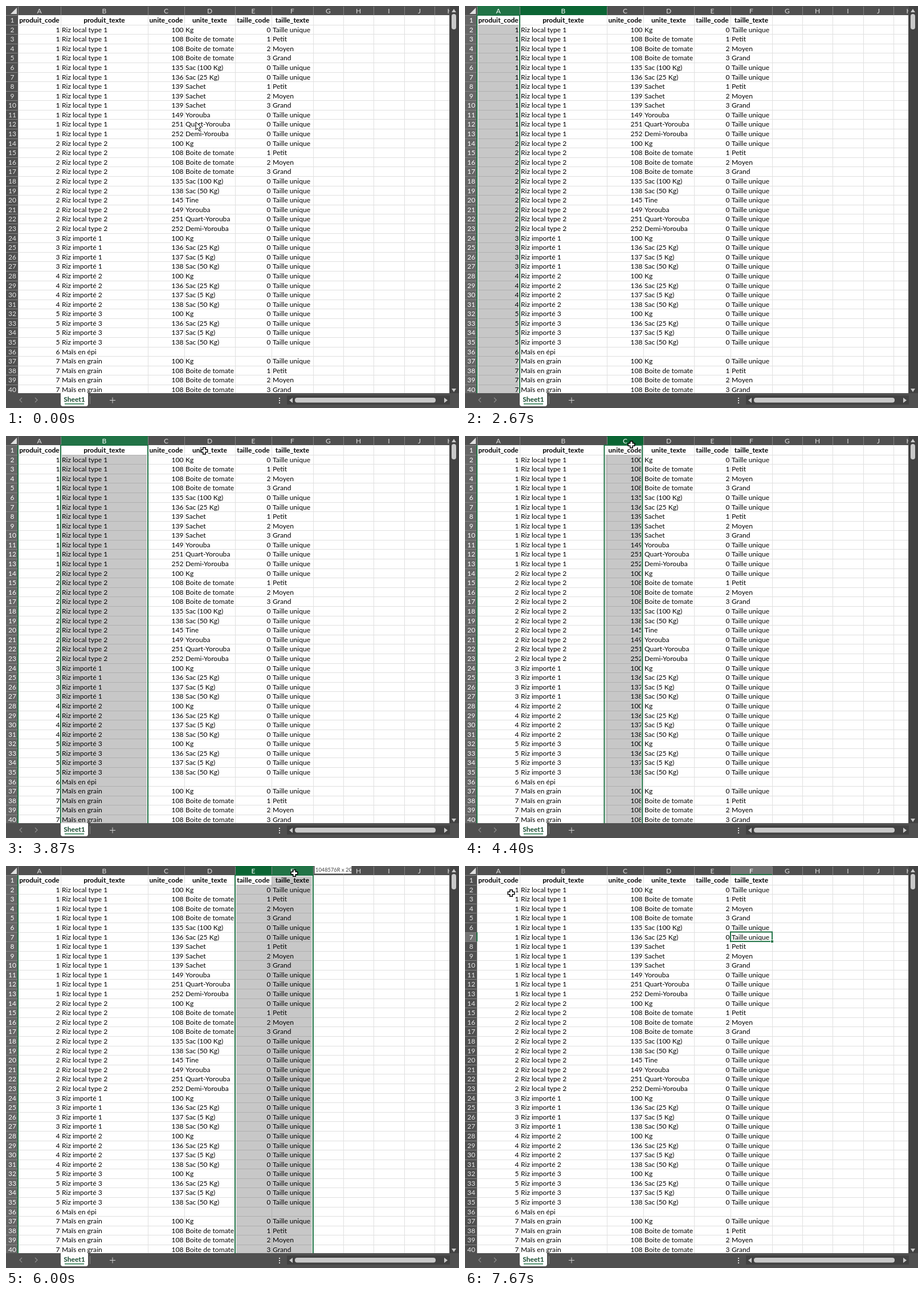
Animation of 795 by 704 pixels, one loop 8000 ms. Source, as an HTML page with a canvas:

```html
<!DOCTYPE html>
<html lang="fr">
<head>
<meta charset="utf-8">
<title>Sheet1</title>
<style>
  html, body { margin: 0; width: 100%; height: 100%; overflow: hidden; background: #505050; }
  canvas { display: block; }
</style>
</head>
<body>
<canvas id="stage" width="795" height="704"></canvas>
<script>
const ctx = document.getElementById('stage').getContext('2d');
const LOOP = 8000, STEP = 200 / 3;
const LEFT = 21, TOP = 16, RIGHT = 778, BOTTOM = 678, ROW_H = 16.59, ROWS = 40;
const GREEN = '#217346', DARK_GREEN = '#0b6534', CHROME = '#505050', ACTIVE = '#737373';
const LIGHT = '#c9c9c9', TRACK = '#424242', SEPARATOR = '#868686', GRID = '#e0e0e0';
const LETTERS = 'ABCDEFGHIJK', WIDTHS = [75, 153, 64, 89, 64, 73], DEFAULT_WIDTH = 53.2;

const EDGES = [LEFT];
[...LETTERS].forEach((_, col) => EDGES.push(EDGES[col] + (WIDTHS[col] ?? DEFAULT_WIDTH)));
const rowTop = row => TOP + (row - 1) * ROW_H;
const columnAt = x => EDGES.findLastIndex(edge => edge <= x);

// Every product is sold in some units, and some units come in three sizes.
const UNITS = {
  100: 'Kg', 108: 'Boite de tomate', 135: 'Sac (100 Kg)', 136: 'Sac (25 Kg)', 137: 'Sac (5 Kg)',
  138: 'Sac (50 Kg)', 139: 'Sachet', 145: 'Tine', 149: 'Yorouba', 251: 'Quart-Yorouba', 252: 'Demi-Yorouba'
};
const SIZES = ['Taille unique', 'Petit', 'Moyen', 'Grand'];
const TITLES = 'produit_code produit_texte unite_code unite_texte taille_code taille_texte'.split(' ');
const pick = test => Object.keys(UNITS).filter(code => test(UNITS[code]));
const isSized = code => /Boite|Sachet/.test(UNITS[code]);
const imported = pick(unit => /^Kg|5 Kg|50 Kg/.test(unit));
const PRODUCTS = [
  ['Riz local type 1', pick(unit => !/\((5|50) Kg|Tine/.test(unit))],
  ['Riz local type 2', pick(unit => !/\((5|25) Kg|Sachet/.test(unit))],
  ...[1, 2, 3].map(n => [`Riz importé ${n}`, imported]),
  ['Maïs en épi', []],
  ['Maïs en grain', pick(unit => /^Kg|Boite/.test(unit))]
];
const cells = PRODUCTS.flatMap(([name, units], i) => units.length
  ? units.flatMap(code => (isSized(code) ? [1, 2, 3] : [0])
      .map(size => [i + 1, name, code, UNITS[code], size, SIZES[size]]))
  : [[i + 1, name]]);

// Ranges selected, by start time.
const SELECTIONS = Object.entries({
  1533: 'J25', 2133: 'A', 3067: 'B', 4333: 'C', 4733: 'C:D', 5733: 'E', 5867: 'E:F', 6600: 'F7'
}).map(([start, range]) => {
  const first = LETTERS.indexOf(range[0]);
  const last = range[1] === ':' ? LETTERS.indexOf(range[2]) : first;
  const row = parseInt(range.slice(1)) || 0;
  const box = [EDGES[first], row ? rowTop(row) : TOP, EDGES[last + 1], row ? rowTop(row + 1) : 700, EDGES[first + 1]];
  return { start: +start, first, last, row, box };
});

// Pointer moves: start, end, then the point reached.
const REST = [333, 203];
const MOVES = [
  [0, 267, 332, 189], [533, 1530, 85, 9], [2600, 2733, 150, 13],
  [3333, 3733, 368, 30], [3733, 4133, 292, 15], [4667, 4867, 375, 13],
  [5067, 5333, 415, 18], [5400, 5533, 435, 12], [5667, 5933, 506, 12.5],
  [6200, 6600, 500, 124], [6667, 7067, 280, 148], [7067, 7667, 81, 47.5]
];

const mix = (a, b, p) => a + (b - a) * p;

function rect(color, x, y, w, h) {
  ctx.fillStyle = color;
  ctx.fillRect(x, y, w, h);
}

function frame(color, width, x0, y0, x1, y1) {
  ctx.strokeStyle = color;
  ctx.lineWidth = width;
  ctx.strokeRect(x0, y0, x1 - x0, y1 - y0);
}

function pill(color, x, y, w, h, radius = 4) {
  ctx.fillStyle = color;
  ctx.beginPath();
  ctx.roundRect(x, y, w, h, radius);
  ctx.fill();
}

function trace(points) {
  ctx.beginPath();
  points.forEach(([x, y]) => ctx.lineTo(x, y));
}

function polygon(color, ...points) {
  ctx.fillStyle = color;
  trace(points);
  ctx.fill();
}

function line(color, width, ...points) {
  ctx.strokeStyle = color;
  ctx.lineWidth = width;
  trace(points);
  ctx.stroke();
}

function label(text, x, y, align = 'left', color = '#000', font = '12.1px') {
  ctx.font = `${font} Lato, sans-serif`;
  ctx.textAlign = align;
  ctx.fillStyle = color;
  ctx.fillText(text, x, y);
}

function plus(color, x, y, reach, width) {
  line(color, width, [x - reach, y], [x + reach, y]);
  line(color, width, [x, y - reach], [x, y + reach]);
}

function drawCross(x, y) {
  plus('#000', x, y, 6.5, 6);
  plus('#fff', x, y, 5, 3);
}

function drawArrow(x, y) {
  const outline = [[0, 0], [0, 14], [3, 11], [6, 16], [8, 15], [6, 10], [10, 10], [0, 0]]
    .map(([dx, dy]) => [x + dx, y + dy]);
  polygon('#fff', ...outline);
  line('#000', 1, ...outline);
}

function drawCells() {
  rect('#fff', LEFT, TOP, RIGHT - LEFT, BOTTOM - TOP);
  for (let row = 2; row <= ROWS; row++) rect(GRID, LEFT, Math.round(rowTop(row)), RIGHT - LEFT, 1);
  EDGES.forEach(x => rect(GRID, Math.round(x), TOP, 1, BOTTOM - TOP));
  TITLES.forEach((title, col) =>
    label(title, (EDGES[col] + EDGES[col + 1]) / 2, 29, 'center', '#000', 'bold 12px'));
  cells.forEach((values, i) => {
    const y = Math.round(rowTop(i + 2) + 13);
    values.forEach((value, col) => col % 2
      ? label(value, EDGES[col] + 2, y)
      : label(value, EDGES[col + 1] - 1.5, y, 'right'));
  });
}

// The selection glides from the previous range, easing out over four steps.
function selectionBox(index, t) {
  const { start, box } = SELECTIONS[index];
  const from = SELECTIONS[Math.max(0, index - 1)].box;
  const p = Math.min(1, (t - start + STEP) / (4 * STEP));
  return box.map((value, i) => mix(from[i], value, 1 - (1 - p) ** 5));
}

function drawSelection({ row, first, last }, [x0, y0, x1, y1, activeRight]) {
  if (!row) {
    const shade = 'rgba(0,0,0,.22)', second = Math.round(rowTop(2));
    rect(shade, x0 + 2, second, x1 - x0 - 4, y1 - second);
    if (last > first) rect(shade, activeRight, TOP + 2, Math.max(0, x1 - 2 - activeRight), second - TOP - 2);
  }
  frame('#fff', 1, x0 + 1.5, y0 + 1.5, x1 - 1.5, y1 - 1.5);
  frame(GREEN, 2, x0, y0, x1, y1);
  if (row) {
    rect('#fff', x1 - 3, y1 - 3, 5, 5);
    rect(GREEN, x1 - 2, y1 - 2, 4, 4);
  }
}

function drawHeaders(selection, hover) {
  rect(CHROME, 0, 0, RIGHT, TOP);
  rect(CHROME, 0, TOP, LEFT, BOTTOM - TOP);
  [...LETTERS].forEach((letter, col) => {
    const x = Math.round(EDGES[col]), width = Math.round(EDGES[col + 1]) - x;
    const selected = selection && col >= selection.first && col <= selection.last;
    if (selected) rect(selection.row ? ACTIVE : GREEN, x, 0, width, TOP);
    if (selected && selection.row) rect(GREEN, x, TOP - 2, width, 2);
    if (col === hover) rect(DARK_GREEN, x, 0, width, TOP);
    rect(SEPARATOR, x, 1, 1, TOP - 1);
    label(letter, x + width / 2, 13, 'center', selected || col === hover ? '#fff' : '#dedede', '12px');
  });
  for (let row = 1; row <= ROWS; row++) {
    const y = Math.round(rowTop(row)), height = Math.round(rowTop(row + 1)) - y;
    const selected = selection && (!selection.row || selection.row === row);
    if (selected) {
      rect(selection.row ? ACTIVE : '#666', 0, y, LEFT, height);
      rect(GREEN, LEFT - 1, y, 2, height);
    }
    rect(SEPARATOR, 0, y, LEFT - 1, 1);
    label(row, 11, Math.round(rowTop(row) + 13), 'center', selected ? '#fff' : '#e6e6e6', '12px');
  }
  polygon('#e0e0e0', [19, 3], [19, 14], [8, 14]);
}

function drawFrame() {
  rect(CHROME, RIGHT, 0, 17, BOTTOM);
  rect(TRACK, 779, 0, 16, BOTTOM);
  polygon(LIGHT, [782, 11], [790, 11], [786, 5]);
  polygon(LIGHT, [782, 670], [790, 670], [786, 676]);
  pill(LIGHT, 782, 14, 8, 27);

  rect(CHROME, 0, BOTTOM, 795, 26);
  for (const [x, turn] of [[26, -2], [53, 2]])
    line('#8d8d8d', 1.2, [x - turn, 686], [x + turn, 690], [x - turn, 694]);
  pill('#fff', 96, BOTTOM, 48, 23, [0, 0, 4, 4]);
  label('Sheet1', 120, 693, 'center', '#17492f', 'bold 12px');
  rect(GREEN, 103, 696, 34, 1.5);
  rect(SEPARATOR, 147, 683, 1, 14);
  plus('#d0d0d0', 187, 690.5, 5, 1);
  for (let y = 686; y < 697; y += 4) rect('#e0e0e0', 479, y, 2, 2);
  rect(TRACK, 493, 682, 286, 16);
  polygon(LIGHT, [503, 686], [503, 695], [497, 690.5]);
  polygon(LIGHT, [769, 686], [769, 695], [775, 690.5]);
  pill(LIGHT, 507, 686, 247, 8.5);
}

function drawTooltip(x) {
  rect('#8a8a8a', x, -1, 66, 15);
  rect('#fff', x + 1, 0, 64, 13);
  label('1048576R x 2C', x + 2, 10, 'left', '#444', '9.3px');
}

function pointerAt(t) {
  let [x, y] = REST;
  for (const [start, end, toX, toY] of MOVES) {
    const p = Math.min(1, Math.max(0, (t - start) / (end - start)));
    const eased = p * p * (3 - 2 * p);
    x = mix(x, toX, eased);
    y = mix(y, toY, eased);
  }
  return [x, y];
}

function render(now) {
  // The picture advances fifteen times per second.
  const t = Math.floor((now % LOOP + 4) / STEP) * STEP + 1;
  const index = SELECTIONS.findLastIndex(item => item.start <= t);
  const selection = SELECTIONS[index];
  const [x, y] = pointerAt(t);

  // Over a header, the pointer shows only while its column is selected.
  const inHeader = y < TOP, column = columnAt(x);
  const pressing = inHeader && selection && !selection.row && column >= selection.first && column <= selection.last;
  const hover = pressing ? selection.first : inHeader ? column : -1;

  ctx.save();
  ctx.beginPath();
  ctx.rect(0, 0, RIGHT, BOTTOM);
  ctx.clip();
  drawCells();
  drawHeaders(selection, hover);
  if (selection) {
    ctx.beginPath();
    ctx.rect(LEFT - 1, TOP - 1, RIGHT, BOTTOM);
    ctx.clip();
    drawSelection(selection, selectionBox(index, t));
  }
  ctx.restore();
  drawFrame();
  if (pressing && selection.last > selection.first) drawTooltip(EDGES[selection.last + 1] + 2);
  if (pressing || !inHeader) (selection ? drawCross : drawArrow)(x, y);
}

const began = performance.now();
function tick() {
  render(performance.now() - began);
  requestAnimationFrame(tick);
}
tick();
</script>
</body>
</html>
```
